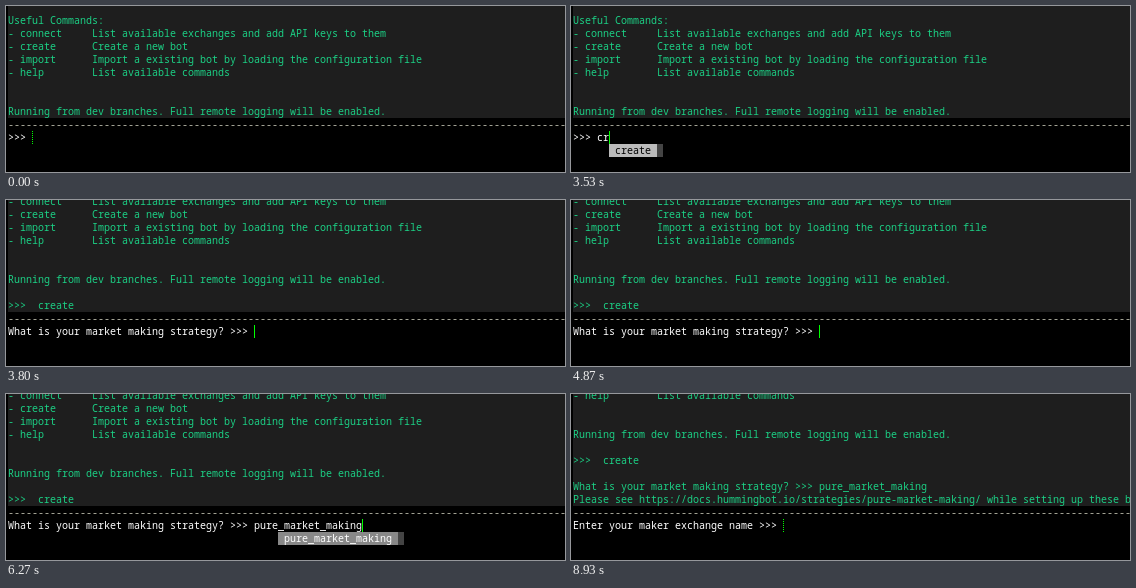
Animation, 559 px wide and 166 px high, one loop 9070 ms. Source, as an HTML page with a canvas:

```html
<!DOCTYPE html>
<html lang="en">
<head>
<meta charset="utf-8">
<title>Terminal session</title>
<style>
  html, body { margin: 0; width: 100%; height: 100%; overflow: hidden; background: #000; }
  canvas { display: block; }
</style>
</head>
<body>
<canvas id="screen" width="559" height="166"></canvas>
<script>
const ctx = document.getElementById('screen').getContext('2d');
const LOOP = 9070, WIDTH = 559, HEIGHT = 166;
const LEFT = 2, CELL = 6, ROW = 13, BASELINE = 10;
const RULE_Y = 112, INPUT_Y = 125, MENU_Y = 138;
const PURE = 'pure_market_making';
const STRATEGY = 'What is your market making strategy? >>> ';

const log = [
  'Useful Commands:',
  '- connect     List available exchanges and add API keys to them',
  '- create      Create a new bot',
  '- import      Import a existing bot by loading the configuration file',
  '- help        List available commands',
  '',
  '',
  'Running from dev branches. Full remote logging will be enabled.',
  '',
  '>>>  create',
  '',
  STRATEGY + PURE,
  'Please see https://docs.hummingbot.io/strategies/pure-market-making/ while setting up these bot',
];

// Each prompt lasts until the next one; lines = visible end of the log.
const prompts = [
  { at: 0, lines: 8, text: '>>> ' },
  { at: 3800, lines: 10, text: STRATEGY },
  { at: 6530, lines: 13, text: 'Enter your maker exchange name >>> ' },
];

// menuAt = number of typed characters to the left of the menu.
const typing = [
  { at: 0, typed: '' },
  { at: 3000, typed: 'c', menu: ['connect', 'create', 'config'], menuAt: 1 },
  { at: 3530, typed: 'cr', menu: ['create'], menuAt: 2 },
  { at: 3600, typed: 'crea', menu: ['create'], menuAt: 4 },
  { at: 3670, typed: 'create' },
  { at: 3800, typed: '' },
  { at: 5130, typed: 'p', menu: [PURE], menuAt: 1 },
  { at: 5400, typed: 'pu', menu: [PURE], menuAt: 2 },
  { at: 5530, typed: 'pure', menu: [PURE], menuAt: 4 },
  { at: 6270, typed: PURE, menu: [PURE], menuAt: 4, selected: true },
  { at: 6530, typed: '' },
];

const cursorStates = [
  [0, 'dotted'], [1200, 'on'], [2130, 'off'], [2670, 'on'],
  [4330, 'off'], [4870, 'on'], [6070, 'off'], [6270, 'on'],
  [7000, 'off'], [7530, 'on'], [8070, 'off'], [8600, 'on'], [8930, 'dotted'],
].map(([at, mode]) => ({ at, mode }));

const current = (steps, t) => steps.filter(step => step.at <= t).pop();

function box(x, y, w, h, color) {
  ctx.fillStyle = color;
  ctx.fillRect(x, y, w, h);
}

function print(text, x, y, color) {
  ctx.fillStyle = color;
  ctx.fillText(text, x, y + BASELINE);
}

function drawLog(count) {
  box(LEFT, 0, WIDTH - LEFT, RULE_Y, '#1e1e1e');
  log.slice(0, count).forEach((line, i) =>
    print(line, LEFT, RULE_Y - (count - i) * ROW, '#1cd085'));
  box(0, RULE_Y, WIDTH, HEIGHT - RULE_Y, '#000');
  print('-'.repeat(93), LEFT, RULE_Y, '#b8b8a8');
}

function drawMenu(items, x, selected) {
  const width = (Math.max(...items.map(item => item.length)) + 2) * CELL;
  items.forEach((item, i) => {
    const y = MENU_Y + i * ROW;
    box(x, y, width, ROW, selected ? '#888' : '#bbb');
    box(x + width, y, CELL, ROW, '#444');
    print(item, x + CELL, y, selected ? '#fff' : '#000');
  });
}

function drawCursor(x, mode) {
  if (mode === 'on') box(x, INPUT_Y, 1, ROW, '#0f0');
  if (mode === 'dotted') {
    for (let y = 0; y < ROW; y += 2) box(x, INPUT_Y + y, 1, 1, '#0f0');
  }
}

function draw(t) {
  const prompt = current(prompts, t);
  const { typed, menu, menuAt, selected } = current(typing, t);
  const inputX = LEFT + prompt.text.length * CELL;

  box(0, 0, WIDTH, HEIGHT, '#000');
  drawLog(prompt.lines);
  print(prompt.text + typed, LEFT, INPUT_Y, '#fff');
  if (menu) drawMenu(menu, inputX + menuAt * CELL, selected);
  drawCursor(inputX + typed.length * CELL, current(cursorStates, t).mode);
}

ctx.font = '10px "Noto Sans Mono", monospace';
const start = performance.now();
function tick() {
  draw((performance.now() - start) % LOOP);
  requestAnimationFrame(tick);
}
tick();
</script>
</body>
</html>
```
